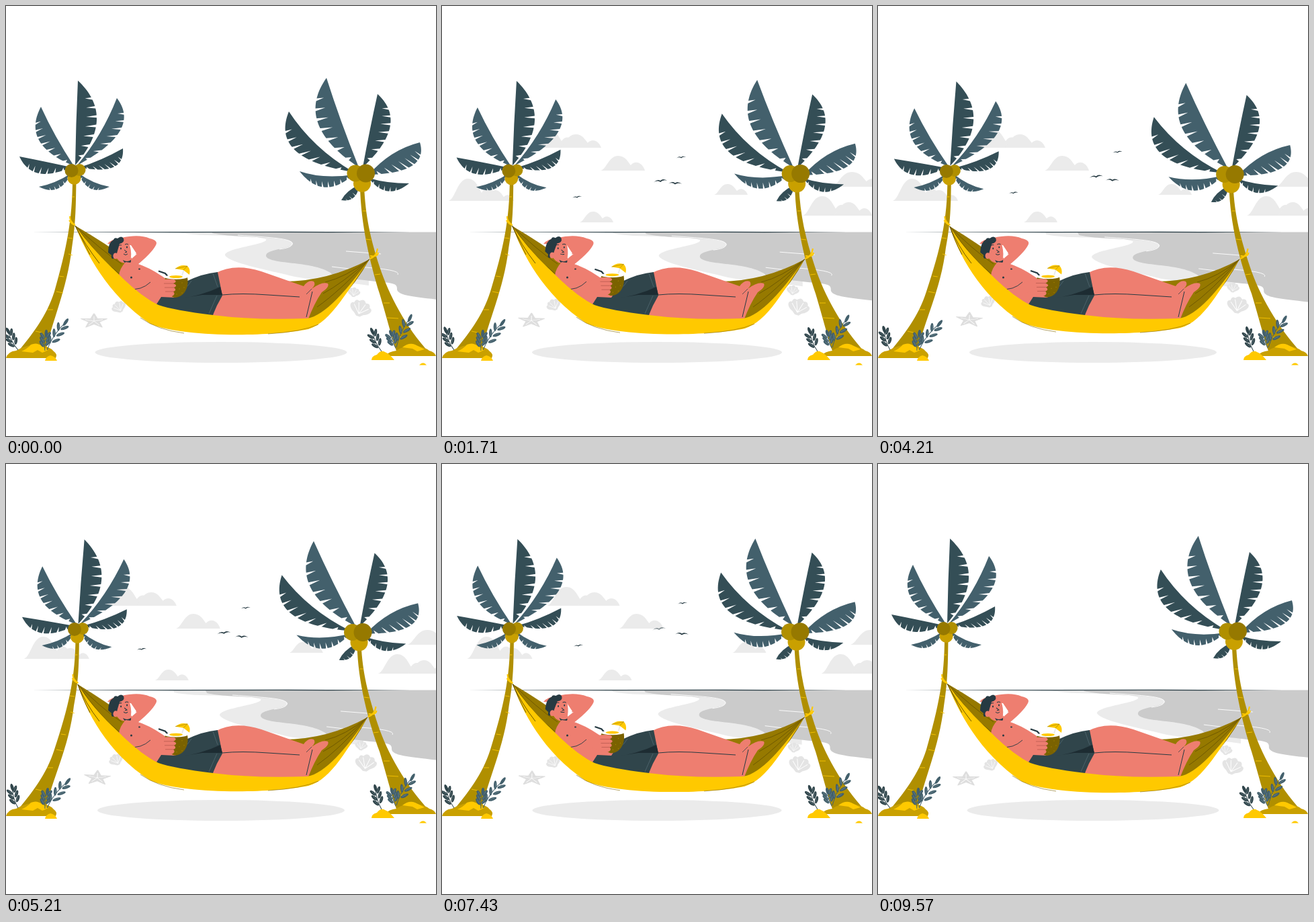
Animation of 640 by 640 pixels, one loop 9640 ms. Source, as an HTML page with a canvas:

```html
<!DOCTYPE html>
<html lang="en">
<head>
<meta charset="utf-8">
<title>Hammock on the beach</title>
<style>
html, body { margin: 0; width: 100%; height: 100%; overflow: hidden; background: #fff; }
canvas { display: block; width: 640px; height: 640px; }
</style>
</head>
<body>
<canvas id="stage" width="640" height="640"></canvas>
<script>
const g = document.getElementById('stage').getContext('2d');
const LOOP = 9640, DEG = Math.PI / 180;
const DARK = '#344e56', BLUE = '#43606c', INK = '#263a42', SKIN = '#ee7e70', YELLOW = '#ffc900',
  GOLD = '#c9a000', TRUNK = '#b08f00', BRONZE = '#967900', PALE = '#ebebeb', SHORTS = '#30454b';

const fill = (color, d) => { g.fillStyle = color; g.fill(new Path2D(d)); };
const line = (color, width, d) => {
  g.strokeStyle = color; g.lineWidth = width; g.stroke(new Path2D(d));
};
const oval = (color, x, y, rx, ry = rx, turn = 0) => {
  g.fillStyle = color; g.beginPath(); g.ellipse(x, y, rx, ry, turn, 0, 7); g.fill();
};
const at = (x, y, turn, draw, sx = 1, sy = sx) => {
  g.save(); g.translate(x, y); g.rotate(turn * DEG); g.scale(sx, sy); draw(); g.restore();
};
const ramp = (t, a, b) => Math.min(1, Math.max(0, (t - a) / (b - a)));
const quad = (a, c, b, t) => (1 - t) * (1 - t) * a + 2 * t * (1 - t) * c + t * t * b;

// tip, base, spine control, outer control, sway in degrees, notches
const leftLeaves = [
  [49, 269, 97, 249, 74, 264, 80, 285, 0, 7],
  [154, 269, 108, 249, 130, 265, 122, 285, 3, 7],
  [165, 137, 106, 237, 143, 193, 203, 186, 3.5, 9],
  [52, 150, 101, 238, 72, 194, 22, 206, -1.5, 9],
  [174, 212, 110, 240, 142, 230, 177, 254, 3, 9],
  [20, 224, 97, 240, 56, 231, 39, 266, -2, 8],
  [107, 111, 103, 237, 104, 175, 165, 165, 2.4, 9]
];
const rightLeaves = [
  [499, 289, 526, 266, 506, 275, 522, 293, -3, 5],
  [437, 246, 517, 251, 472, 258, 472, 291, -5, 9],
  [600, 264, 540, 256, 566, 264, 566, 291, 2, 7],
  [477, 107, 525, 240, 497, 170, 428, 176, -6.5, 9],
  [553, 131, 531, 240, 542, 180, 601, 175, 0, 9],
  [421, 157, 517, 247, 457, 212, 392, 228, -4, 9],
  [616, 203, 540, 251, 572, 214, 630, 249, 2, 9]
];

function leaf(color, [tx, ty, bx, by, sx, sy, ox, oy, turn, n], sway) {
  const outer = t => [quad(tx, ox, bx, t), quad(ty, oy, by, t)];
  at(bx, by, turn * sway, () => {
    g.translate(-bx, -by);
    g.fillStyle = color;
    g.beginPath();
    g.moveTo(bx, by);
    g.quadraticCurveTo(sx, sy, tx, ty);
    for (let i = 1; i <= n * 4; i++) {
      const t = i / n / 4, [x, y] = outer(t);
      g.lineTo(x, y);
      if (i % 4 || t < .15 || t > .95) continue;
      const depth = .38 + .3 * t;
      g.lineTo(x + (quad(tx, sx, bx, t) - x) * depth, y + (quad(ty, sy, by, t) - y) * depth);
      g.lineTo(...outer(t + .03));
    }
    g.fill();
  });
}

function leftTree(u) {
  const a = 4.5 * u, m = 3 * u;
  fill(TRUNK, `M${99 + a} 258C${99 + a} 318 ${90 + m} 362 72 425C60 463 38 490 15 518L58 518C68 470 ${91 + m} 422 ${98 + m} 360C${104 + a} 322 ${104 + a} 295 ${104.5 + a} 258Z`);
  line(YELLOW, .8, `M${92 + m} 345l7 1M${93 + m} 369l6 2M${79 + m} 402l7 1M75 425l10 2M62 452h8M44 484l9 2M${98 + a} 284h4`);
  line(YELLOW, 2, `M${95 + a} 313q0 8 8 13M${94 + a} 319q4 6 9 7`);
  at(a, u, 0, () => {
    leftLeaves.forEach((l, i) => leaf([BLUE, BLUE, BLUE, BLUE, DARK, DARK, DARK][i], l, u));
    oval(GOLD, 101.5, 256, 10);
    oval(TRUNK, 109.5, 244, 9);
    oval(BRONZE, 97.5, 245, 10);
  });
  fill(GOLD, 'M0 524Q3 514 15 513Q30 504 48 504Q66 507 71 514Q77 518 74 524Z');
  fill(YELLOW, 'M23 514Q32 510 37 504Q46 500 53 506L63 512L54 516L47 512L40 516Z');
  plant(18, 512, -28 + 12 * u, 32, SHORTS);
  plant(58, 513, 4 + 4 * u, 26, BLUE);
  plant(61, 512, 34 + 4 * u, 50, BLUE);
  fill(YELLOW, 'M58 528Q59 522 66 520Q73 521 76 528Z');
}

function rightTree(u) {
  const a = -4.5 * u, m = -2.5 * u;
  fill(TRUNK, `M${527 + a} 268C${528 + a} 325 ${542 + m} 383 556 428C568 468 573 490 582 516L630 516C595 478 ${570 + m} 430 ${556 + m} 388C${542 + m} 345 ${535 + a} 312 ${533 + a} 268Z`);
  line(YELLOW, .8, `M${535 + m} 347l8 1M${549 + m} 400l8-1M567 464l17 1M562 442h9M580 492l10 1M${531 + a} 305h5`);
  line(YELLOW, 2, `M${541 + m} 376q10-2 12-15M${542 + m} 372q11 2 12-5`);
  at(a, 1.5 * u, 0, () => {
    rightLeaves.forEach((l, i) => leaf([DARK, BLUE, DARK, BLUE, DARK, DARK, BLUE][i], l, u));
    oval(GOLD, 530, 264, 13);
    oval(TRUNK, 520, 249, 12.5);
    oval(BRONZE, 535.5, 249, 13.5);
  });
  fill(GOLD, 'M564 521Q570 514 581 513Q592 505 609 505Q624 508 630 513Q638 515 640 521Z');
  fill(YELLOW, 'M590 508Q600 500 609 504L623 511L612 514L605 510Z');
  plant(559, 514, -25 + 9 * u, 33, SHORTS);
  plant(580, 509, -18 + 4 * u, 23, BLUE);
  plant(581, 508, 25 + 5 * u, 48, BLUE);
  fill(YELLOW, 'M544 527Q544 521 552 519Q558 511 564 515Q570 517 578 527ZM615 534.5Q621 528 626 534.5Z');
}

function plant(x, y, turn, size, color) {
  at(x, y, turn, () => {
    line(color, 1, `M0 0Q${-size * .12} ${-size * .5} 0 ${-size}`);
    const r = 4 + size / 20;
    for (let i = 1; i < 4; i++) for (const side of [-1, 1]) {
      const py = -size * (i * .23 + (side > 0 ? .07 : 0));
      oval(color, side * 4.5 - 1, py - 4, r, 2.3, -side * 55 * DEG);
      line('#8fa3aa', .4, `M${side * 2 - 1} ${py - 1}l${side * 4} -6`);
    }
    oval(color, 0, -size, 2.3, r);
  });
}

const CLOUD = 'M0 1C.14 .9 .18 0 .4 0C.55 0 .62 .4 .68 .64C.79 .25 .95 .5 1 1Z';
function clouds(t) {
  const x = (t - 1710) * .0048;
  g.globalAlpha = ramp(t, 1050, 1600) * (1 - ramp(t, 7500, 8050));
  for (const [cx, cy, w, h] of [[10, 257, 72, 33], [60, 274, 47, 16], [129, 183, 72, 28], [174, 191, 63, 20],
    [236, 223, 66, 22], [205, 306, 50, 16], [405, 265, 50, 16], [580, 247, 76, 22], [537, 283, 72, 29], [582, 292, 58, 20]])
    at(cx + x, cy, 0, () => fill(PALE, CLOUD), w, h);
  const p = (t - 1710) / 5720;
  for (const [bx, by, dx, dy, s, turn, out] of [[325, 260, -2, -15, 1, -4, 7200],
    [347, 263.5, 10, -11, 1, 5, 7500], [356, 225, 2, -18, .7, -3, 7500], [201, 284, 2, -14, .7, -4, 7500]]) {
    g.globalAlpha = ramp(t, 1050, 1600) * (1 - ramp(t, out, out + 500));
    at(bx + dx * p * p, by + dy * p, turn, () =>
      fill(INK, 'M-10 2Q-5 -3 0 0Q4 -3.5 10 .5Q4 -1.5 0 2Q-5 -1.5 -10 2Z'), s);
  }
  g.globalAlpha = 1;
}

function sea(u) {
  g.save();
  g.beginPath(); g.rect(0, 336.5, 640, 200); g.clip();
  at(-8 * u, 3 * u, 0, () => {
    fill(PALE, 'M255 325L258 337C290 345 360 338 387 347C392 355 326 360 326 371C332 383 400 395 430 403C470 410 500 410 540 416V325Z');
    fill('#cbcbcb', 'M300 325L307 338C340 346 424 342 427 353C428 362 386 361 387 372C390 385 455 379 483 397C488 406 515 405 550 410C575 412 582 413 582 420C580 432 610 433 660 439V325Z');
    line('#fff', .9, 'M345 341C400 345 428 346 426 355Q424 360 407 362M506 365l52 4M520 388Q590 392 583 400M485 388l25 3');
  });
  g.restore();
  fill(INK, 'M38 336.5L258 336L420 335.8L602 336.5L480 337.2L400 337L258 337.3Z');
}

function shell(x, y, turn, s) {
  at(x, y, turn, () => {
    fill('#e4e4e4', 'M-3 13L-8 9C-21 3 -18 -6 -13 -5Q-12 -13 -6 -10Q0 -17 5 -10Q12 -13 13 -5C19 -5 19 4 7 9L3 13Z');
    line('#fff', 1, 'M0 9L-12 -3M0 9L-6 -8M0 9L5 -8M0 9L12 -3');
  }, s);
}

function ground(u) {
  at(131 + 5 * u, 469 - 2 * u, 3 * u, () => {
    let d = '';
    for (let i = 0; i < 10; i++) {
      const r = i % 2 ? 8 : 20, q = (i * 36 - 90) * DEG;
      d += (i ? 'L' : 'M') + r * Math.cos(q) + ' ' + r * Math.sin(q);
    }
    g.lineJoin = 'round';
    fill('#dedede', d + 'Z');
    line('#dedede', 2, d + 'Z');
    line('#fff', 1, 'M0 0V-13M0 0L13 -4M0 0L8 11M0 0L-8 11M0 0L-13 -4');
  }, 1, .55);
  shell(528 + 8 * u, 450 - 5 * u, 20 - 10 * u, .95);
  shell(518 + 11 * u, 426 - 7 * u, 10, .55);
  shell(168 - 4 * u, 448 - 8 * u, -25, .65);
  oval(PALE, 320, 515.5, 187.5 - 3.5 * u, 15.5);
}

function head(h) {
  fill(SKIN, `M151 354Q156 347 172 345Q198 339 ${214 + 2 * h} 346Q${227 + 2 * h} 349 ${223 + 2 * h} 356Q${217 + 2 * h} 368 191 389L177 388L185 376L194 368L186 356Z`);
  fill('#fff', `M187 366Q190 370 ${195 + h} 369L187 376Z`);
  at(178, 385, 5 * h, () => {
    g.translate(-178, -385);
    fill(SKIN, 'M163 352Q176 345 183 353Q187 363 186 374Q184 383 178 383Q167 382 163 372Z');
    fill(INK, 'M152 367Q152 352 160 348Q161 344 166 346Q172 341 175 346Q177 352 169 354Q166 364 164 372L160 376Q156 377 157 371Z');
    oval(SKIN, 163, 372, 3.6, 4.6);
    fill(INK, 'M174 378Q180 382 186 378Q187 383 181 384Q176 383 174 378Z');
    oval(INK, 171, 361, 1, 1.4);
    oval(INK, 180, 359, 1, 1.4);
    line(INK, 1, `M167 357q3-2 5-1M177 355q3-2 5 0M176 363l4 3-3 1M175 369q3 ${3 - 2 * h} 6 0`);
  });
}

function man(h) {
  head(h);
  fill(SKIN, 'M178 381Q169 391 168 401C174 428 205 450 236 452L269 427L232 402Q213 389 194 383Z');
  oval(INK, 186.5, 404, 1.5);
  oval(INK, 198.5, 391.5, 1.5, 1);
  fill(SKIN, 'M311 398Q340 382 380 395L443 417Q450 407 458 410Q462 414 455 421Q470 410 479 413Q482 418 470 426Q459 442 449 468L308 465Z');
  line(INK, 1, 'M322 430Q350 427 390 430L437 433M456 425L447 463');
  line(INK, .7, 'M455 421L447 429');
  fill(SHORTS, 'M268 410Q293 398 315 396L322 431Q313 446 307 462L222 447L231 433L252 434Z');
  fill('#1d2c32', 'M254 436Q290 432 319 418L322 430L292 430Z');
  line('#5d747d', .6, 'M308 398L315 418M314 431L302 458M264 421Q272 417 276 409');

  at(.5 * h, -3.5 * h, 0, () => {
    line(INK, 2.2, 'M227 394.5L237 398L243 405');
    line(PALE, 2, 'M265 392L261 404');
    fill('#7a6200', 'M237 404Q253 400 270 404C273 420 264 434 251 434C239 430 233 420 237 404Z');
    for (const [x, y] of [[262, 412], [265, 419], [258, 421], [262, 427], [254, 429]]) oval('#a08000', x, y, .7);
    oval('#fff', 253, 403.5, 17, 3.2);
    oval(YELLOW, 253, 403, 10, 2);
    fill(YELLOW, 'M252 391Q260 384 270 387Q275 392 273 400L264 393Z');
    line(BRONZE, .6, 'M270 387L252 391M270 387L264 393');
    fill(SKIN, `M205 ${420 + 3 * h}L220 412Q232 405 250 407Q256 410 249 413Q257 416 250 419Q255 423 249 425Q253 429 247 432Q233 433 225 426L207 ${433 + 3 * h}Z`);
    line('#b85a50', .8, 'M235 413H250M236 419H250M237 425H249');
  });
  line(INK, .9, `M183 421Q201 424 215 ${411 - h}`);
}

function hammockBack(u) {
  const l = `${103 + 4 * u} ${327 + u}`, r = `${541 - 3 * u} 377`;
  fill(BRONZE, `M${l}Q150 354 184 380Q215 395 240 410H405Q475 412 ${r}Q500 450 448 468H240Q150 405 ${l}Z`);
  line('#6b5600', .9, `M${l}Q140 362 172 384M${l}Q138 375 169 399M${r}Q505 404 475 411M${r}Q500 413 472 428M${r}Q496 425 463 448`);
}

function hammockFront(u) {
  const l = `${103 + 4 * u} ${327 + u}`, r = `${541 - 3 * u} 377`, b = -2 * u;
  fill(YELLOW, `M${l}C118 365 150 430 215 ${473 + b}C260 ${493 + b} 390 ${493 + b} 450 ${481 + b}C485 470 510 420 ${r}C508 422 474 462 448 465Q370 468 308 460Q250 453 227 445C198 431 172 403 158 390Q125 358 ${l}Z`);
  line('#5c4a00', .9, `M${l}Q118 356 139 383M${l}Q113 347 125 370`);
  line('#806600', .6, `M200 ${464 + b}Q225 ${482 + b} 265 ${487 + b}M390 ${488 + b}Q440 ${485 + b} 465 ${474 + b}`);
}

function draw(t) {
  const phase = t / LOOP * Math.PI;
  const sway = (Math.sin(phase) + Math.sin(phase) ** 2) / 2;
  const breath = Math.sin(2 * phase) ** 2;
  g.fillStyle = '#fff';
  g.fillRect(0, 0, 640, 640);
  clouds(t);
  sea(sway);
  ground(sway);
  leftTree(sway);
  rightTree(sway);
  hammockBack(sway);
  man(breath);
  hammockFront(sway);
}

const start = performance.now();
function tick() {
  draw((performance.now() - start) % LOOP);
  requestAnimationFrame(tick);
}
tick();
</script>
</body>
</html>
```
